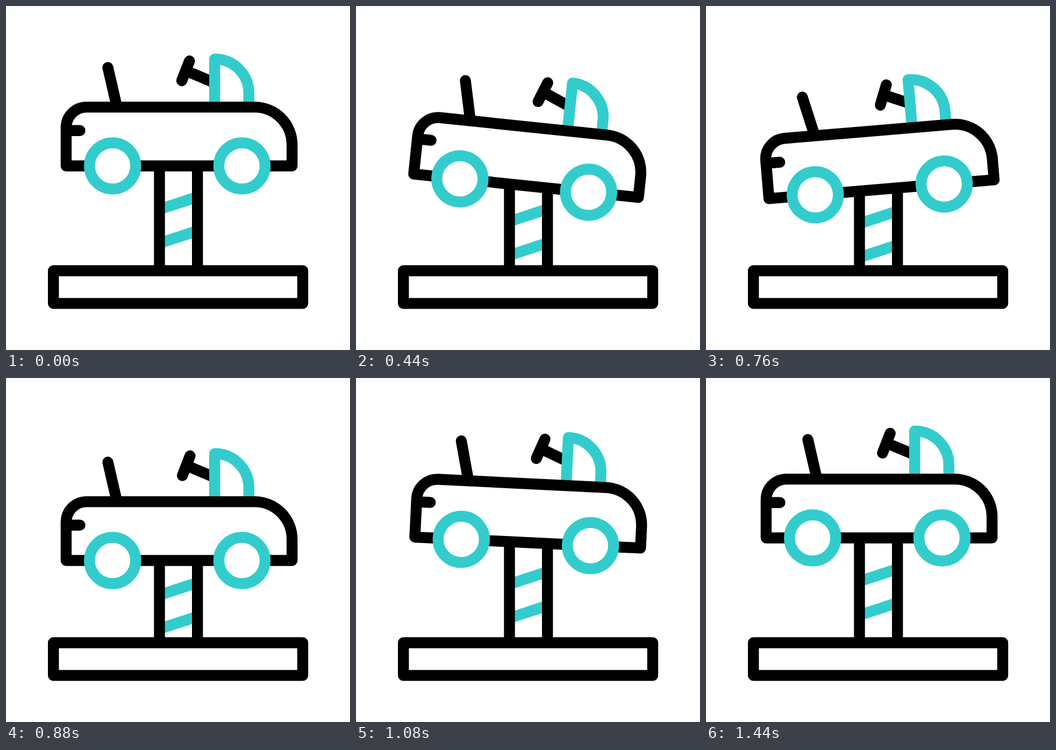
An HTML page that plays this animation: 640x640 px, repeating every 1480 ms.

```html
<!DOCTYPE html>
<html lang="en">
<head>
<meta charset="utf-8">
<title>Spring car ride</title>
<style>
  html, body { margin: 0; height: 100%; overflow: hidden; background: #fff; }
  svg { display: block; width: 100%; height: 100%; }
  .ink { stroke: #000; }
  .teal { stroke: #3cc; }
</style>
</head>
<body>
<svg viewBox="0 0 640 640" fill="none" stroke-width="20.4" stroke-linejoin="round">
  <path id="stripes" class="teal" d="M285.5 378.3L356 355.2M285.5 441.3L356 418.2"/>
  <path id="posts" class="ink"/>
  <path class="ink" d="M88.2 492.5H552V553.4H88.2Z"/>
  <g id="car" stroke-linecap="round">
    <path class="ink" d="M189.5 114.5L206 186"/>
    <path id="shaft" class="ink"/>
    <path id="handle" class="ink" d="M341.3 102.3L327 139"/>
    <path class="teal" d="M388.2 188V98.6A63.5 63.5 0 0 1 451.8 162V188"/>
    <path class="ink" fill="#fff" d="M111.9 297.5V226.2A38 38 0 0 1 149.9 188.1H462.5A69.7 69.7 0 0 1 532.2 257.8V297.5Z"/>
    <path class="ink" d="M112 231.7H137.5"/>
    <g class="teal" fill="#fff">
      <circle cx="198.3" cy="297.5" r="43"/>
      <circle cx="439" cy="297.5" r="43"/>
    </g>
  </g>
</svg>
<script>
const LOOP = 1480, STEP = 40;
const [stripes, posts, car, shaft, handle] =
  ['stripes', 'posts', 'car', 'shaft', 'handle'].map(id => document.getElementById(id));

const smooth = u => u * u * (3 - 2 * u);
const sineOut = u => Math.sin(u * Math.PI / 2);

// Keys are [time, value, easing into this key].
const drop = [[180, 0], [523, 43.6], [842, 43.6], [1176, 0]];
const tilt = [[120, 0], [420, 6.1, sineOut], [708, -5.5], [1005, 3.4], [1280, 0]];
const slide = [[380, 0], [650, 9], [950, 0], [1240, 9], [1510, 0]];

function valueAt(keys, t) {
  const i = keys.findIndex(key => key[0] > t);
  if (i === 0) return keys[0][1];
  if (i < 0) return keys[keys.length - 1][1];
  const [t0, from] = keys[i - 1];
  const [t1, to, ease = smooth] = keys[i];
  return from + (to - from) * ease((t - t0) / (t1 - t0));
}

function draw() {
  const t = Math.floor(performance.now() % LOOP / STEP) * STEP;
  const y = valueAt(drop, t), push = valueAt(slide, t);
  const dx = push * 0.924, dy = push * 0.383;
  car.setAttribute('transform', `translate(0 ${y}) rotate(${valueAt(tilt, t)} 322 243)`);
  stripes.setAttribute('transform', `translate(0 ${y * 0.607})`);
  posts.setAttribute('d', `M285.5 ${290 + y}V492.5M356.2 ${290 + y}V492.5`);
  handle.setAttribute('transform', `translate(${dx} ${dy})`);
  shaft.setAttribute('d', `M${336 + dx} ${121 + dy}L387.5 142.6`);
  requestAnimationFrame(draw);
}
draw();
</script>
</body>
</html>
```
